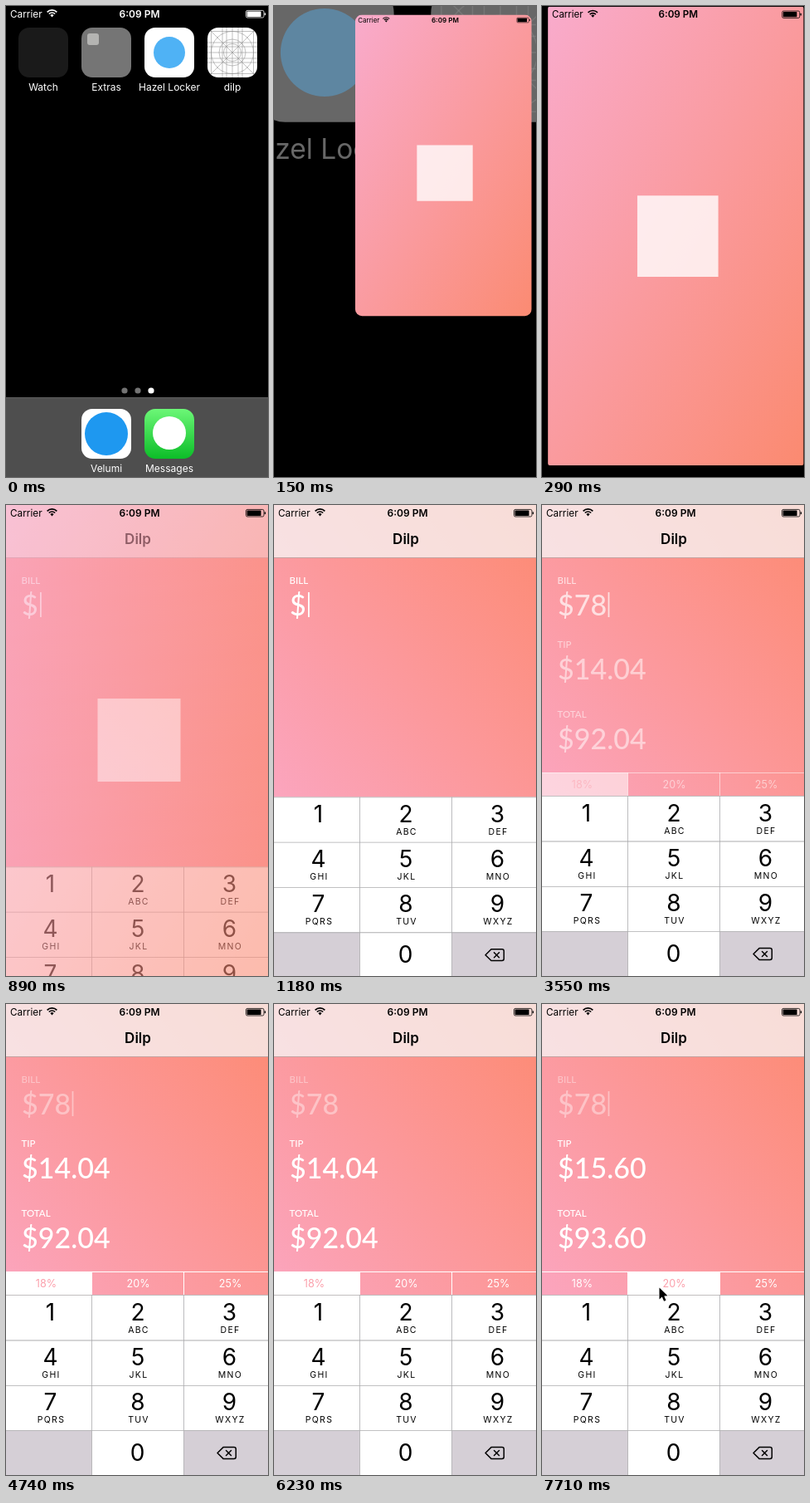
An HTML page with a canvas that plays this animation: 316x567 px, repeating every 8000 ms.

```html
<!DOCTYPE html>
<html lang="en">
<head>
<meta charset="utf-8">
<title>Tip calculator</title>
<style>
html, body { margin: 0; width: 316px; height: 567px; overflow: hidden; background: #000; }
canvas { display: block; width: 316px; height: 567px; }
</style>
</head>
<body>
<canvas id="stage"></canvas>
<script>
const W = 316, H = 567, LOOP = 8000, STEP = 148.2;
const SANS = 'Inter, Roboto, sans-serif', GEO = 'Lato, "Open Sans", sans-serif';
const dpr = window.devicePixelRatio || 1;

function sizeUp(canvas) {
  canvas.width = W * dpr;
  canvas.height = H * dpr;
  const c = canvas.getContext('2d');
  c.scale(dpr, dpr);
  return c;
}
const stage = document.getElementById('stage');
const layer = document.createElement('canvas');
const main = sizeUp(stage), over = sizeUp(layer);
let g = main;

const clamp = x => Math.max(0, Math.min(1, x));
const ease = x => { x = clamp(x); return x * x * (3 - 2 * x); };
const mix = (a, b, p) => a + (b - a) * p;
const white = a => `rgba(255,255,255,${a})`;
// Share of the way still to go for a critically damped spring
function spring(t, start, rate) {
  const x = Math.max(0, t - start) * rate;
  return (1 + x) * Math.exp(-x);
}

function box(x, y, w, h, fill, r = 0) {
  g.fillStyle = fill;
  g.beginPath();
  g.roundRect(x, y, w, h, r);
  g.fill();
}
function disc(x, y, r, fill) {
  g.fillStyle = fill;
  g.beginPath();
  g.arc(x, y, r, 0, 7);
  g.fill();
}
function text(s, x, y, font, fill, align = 'center', gap = 0) {
  g.font = font;
  g.fillStyle = fill;
  g.textAlign = align;
  g.letterSpacing = gap + 'px';
  g.fillText(s, x, y);
}
function line(...p) {
  g.beginPath();
  for (let i = 0; i < p.length; i += 2) g.lineTo(p[i], p[i + 1]);
  g.stroke();
}

// Corner to corner gradient in unit space; up = from bottom left to top right
function wash(h, up, from, to) {
  const k = 2 / (1 / (W * W) + 1 / (h * h));
  const dx = k / W, dy = k / h, y0 = up ? h : 0;
  const grad = g.createLinearGradient(0, y0, dx, up ? y0 - dy : dy);
  grad.addColorStop(0, from);
  grad.addColorStop(1, to);
  box(0, 0, W, H, grad);
}

function statusBar(ink) {
  text('Carrier', 5, 13.5, '400 11.8px ' + SANS, ink, 'left');
  text('6:09 PM', 161, 13.5, '600 12px ' + SANS, ink);
  g.strokeStyle = ink;
  g.lineWidth = 1.7;
  for (const r of [8.3, 5.2]) {
    g.beginPath();
    g.arc(55.5, 13.2, r, -Math.PI * 0.75, -Math.PI * 0.25);
    g.stroke();
  }
  g.fillStyle = ink;
  g.beginPath();
  g.moveTo(55.5, 13.4);
  g.arc(55.5, 13.2, 3, -Math.PI * 0.75, -Math.PI * 0.25);
  g.fill();
  g.lineWidth = 0.8;
  g.beginPath();
  g.roundRect(289.5, 5.4, 21.5, 8.6, 1.6);
  g.stroke();
  box(290.6, 6.5, 17, 6.4, ink, 0.6);
  box(311.8, 8.2, 1.3, 3, ink, 0.6);
}

function gridIcon(x, y) {
  box(x, y, 60, 60, '#fff', 13);
  g.save();
  g.beginPath();
  g.roundRect(x, y, 60, 60, 13);
  g.clip();
  g.translate(x, y);
  g.strokeStyle = '#8c8c8c';
  g.lineWidth = 0.55;
  for (const p of [4.5, 18, 23, 30, 37, 42, 55.5]) {
    line(p, 0, p, 60);
    line(0, p, 60, p);
  }
  line(0, 0, 60, 60);
  line(60, 0, 0, 60);
  for (const r of [10.5, 16, 25.5]) {
    g.beginPath();
    g.arc(30, 30, r, 0, 7);
    g.stroke();
  }
  g.restore();
}

function home() {
  const label = (s, x, y) => text(s, x, y, '400 12px ' + SANS, '#fff');
  box(0, 0, W, H, '#000');
  box(15, 26, 60, 60, '#1a1a1a', 13);
  box(91, 26, 60, 60, '#757575', 13);
  box(98, 33, 14, 14, '#b4b4b2', 3);
  box(167, 26, 60, 60, '#fff', 13);
  disc(197, 56, 19, '#4fb2f5');
  gridIcon(243, 26);
  label('Watch', 45, 102);
  label('Extras', 121, 102);
  label('Hazel Locker', 197, 102);
  label('dilp', 273, 102);
  [143, 159, 175].forEach((x, i) => disc(x, 463, 3.6, i === 2 ? '#fff' : '#737373'));

  box(0, 471, W, 96, '#4e4e4e');
  box(0, 471, W, 0.7, '#626262');
  box(91, 485, 60, 60, '#fff', 13);
  disc(121, 515, 26, '#1e98f0');
  const green = g.createLinearGradient(0, 485, 0, 545);
  green.addColorStop(0, '#6cf777');
  green.addColorStop(1, '#0cbd28');
  box(167, 485, 60, 60, green, 13);
  disc(197, 514, 20, '#fff');
  label('Velumi', 121, 561);
  label('Messages', 197, 561);
  statusBar('#fff');
}

function launch() {
  wash(H, false, '#f9abcc', '#fb8a70');
  box(110.5, 233, 100, 100, white(0.8));
}

function keypad(top) {
  const cols = [103.5, 214.5], mids = [53.5, 159, 269.5];
  const letters = ['', 'ABC', 'DEF', 'GHI', 'JKL', 'MNO', 'PQRS', 'TUV', 'WXYZ'];
  box(0, top, W, H, '#fff');
  box(0, top + 163, 103.5, 60, '#d5cfd6');
  box(214.5, top + 163, 110, 60, '#d5cfd6');
  for (let i = 0; i < 4; i++) box(0, top + i * 54.3, W, 0.8, '#acacae');
  for (const x of cols) box(x - 0.4, top, 0.8, 230, '#acacae');
  letters.forEach((s, i) => {
    const x = mids[i % 3], y = top + Math.floor(i / 3) * 54.2;
    text(i + 1, x, y + 30.4, '400 28px ' + SANS, '#000');
    text(s, x + 1, y + 45.6, '400 10.5px ' + SANS, '#000', 'center', 1.3);
  });
  text('0', 158.5, top + 199.6, '400 28px ' + SANS, '#000');

  g.save();
  g.translate(255, top + 182.5);
  g.strokeStyle = '#000';
  g.lineWidth = 1.5;
  g.lineJoin = g.lineCap = 'round';
  g.beginPath();
  g.moveTo(0, 7.7);
  g.lineTo(7, 0.8);
  g.lineTo(20, 0.8);
  g.quadraticCurveTo(22.3, 0.8, 22.3, 3);
  g.lineTo(22.3, 12.4);
  g.quadraticCurveTo(22.3, 14.6, 20, 14.6);
  g.lineTo(7, 14.6);
  g.closePath();
  g.stroke();
  line(10.5, 4.7, 16.5, 10.7);
  line(16.5, 4.7, 10.5, 10.7);
  g.restore();
}

function caretAlpha(t) {
  const gaps = [[2000, 2500], [2890, 3400], [4145, 4700], [5110, 5770],
    [6070, 6650], [6960, 7540]];
  for (const [a, b] of gaps) if (t >= a && t < b) return 1 - clamp((t - a) / 150);
  return 1;
}

function amount(name, value, y, alpha) {
  text(name, 18.5, y - 38, '500 11.5px ' + GEO, white(alpha), 'left');
  text(value, 19, y, '500 34px ' + GEO, white(alpha), 'left');
}

function tabs(show, picked, press) {
  g.globalAlpha = show;
  box(0, 322, W, 1, '#fff');
  ['18%', '20%', '25%'].forEach((s, i) => {
    const x = [0, 104, 215][i], on = i === picked;
    if (i) box(x - 1, 322, 1, 28.5, '#fff');
    if (on) box(x, 322, i ? 110 : 103.5, 28.5, '#fff');
    else if (i === press) box(x, 322, 110, 28.5, white(0.3));
    text(s, [48.5, 159.5, 270.5][i], 341, '400 12.6px ' + SANS, on ? '#fb9fab' : '#fff');
  });
  g.globalAlpha = 1;
}

function calculator(t) {
  const show = ease((t - 3350) / 400);
  const picked = t > 7650 ? 1 : 0, rate = [0.18, 0.2][picked];
  const digits = t < 3390 ? '' : t < 3530 ? '7' : '78';
  const bill = Number(digits), dim = 1 - 0.6 * show;

  wash(411, true, '#fba7c4', '#fd8a72');
  amount('BILL', '$' + digits, 133, dim);
  box([41, 60.5, 79.6][digits.length], 105, 1.8, 30, white(dim * caretAlpha(t)));
  if (show > 0) {
    amount('TIP', '$' + (bill * rate).toFixed(2), 210, show);
    amount('TOTAL', '$' + (bill * (1 + rate)).toFixed(2), 294, show);
    tabs(show, picked, t > 7540 ? 1 : -1);
  }
  box(0, 0, W, 64, 'rgba(247,247,247,.76)');
  box(0, 63.3, W, 0.8, '#b38f8c');
  text('Dilp', 159, 47, '600 17px ' + SANS, '#000');
  keypad(350.3 + 216 * (t > 1400 ? 0 : spring(t, 775, 0.0179)));
}

function pointer(t) {
  if (t < 6650) return;
  const q = clamp((t - 6669) / 593), p = 1 - q;
  const bend = (a, b, c) => p * p * a + 2 * p * q * b + q * q * c;
  g.save();
  g.translate(bend(300, 170, 141.5), bend(4, 430, 341.5));
  g.beginPath();
  [[0, 0], [0, 14], [3.3, 11], [5.6, 16.2], [8, 15.2], [5.8, 10.1], [10, 9.8]]
    .forEach(([x, y]) => g.lineTo(x, y));
  g.closePath();
  g.lineWidth = 1.6;
  g.strokeStyle = '#fff';
  g.stroke();
  g.fillStyle = '#000';
  g.fill();
  g.restore();
}

// The app window grows from the tapped icon to the whole screen
function zoomIn(t) {
  let left = spring(t, 60, 0.0228);
  if (left < 0.004) left = 0;
  const grow = mix(4, 1, left);
  const x = 243 * left, y = 26 * left, w = mix(W, 60, left), h = mix(H, 60, left);
  box(0, 0, W, H, '#000');
  if (left > 0.1) {
    g.save();
    g.globalAlpha = left;
    g.translate(273, 56);
    g.scale(grow, grow);
    g.translate(-273, -56);
    home();
    g.restore();
  }
  g.save();
  g.beginPath();
  g.roundRect(x, y, w, h, 13 * Math.sqrt(left));
  g.clip();
  g.translate(x, y);
  g.scale(w / W, w / W);
  launch();
  statusBar('#000');
  g.restore();
}

function draw(ms) {
  // The picture advances in even steps
  const t = Math.floor((ms + 10) / STEP) * STEP;
  const fade = ease((t - 705) / 410);
  g = main;
  if (t < 60) return home();
  if (fade === 0) return zoomIn(t);
  if (fade < 1) launch();
  g = over;
  calculator(t);
  g = main;
  g.globalAlpha = fade;
  g.drawImage(layer, 0, 0, W, H);
  g.globalAlpha = 1;
  statusBar('#000');
  pointer(t);
}

const begin = performance.now();
function loop() {
  draw((performance.now() - begin) % LOOP);
  requestAnimationFrame(loop);
}
loop();
</script>
</body>
</html>
```
